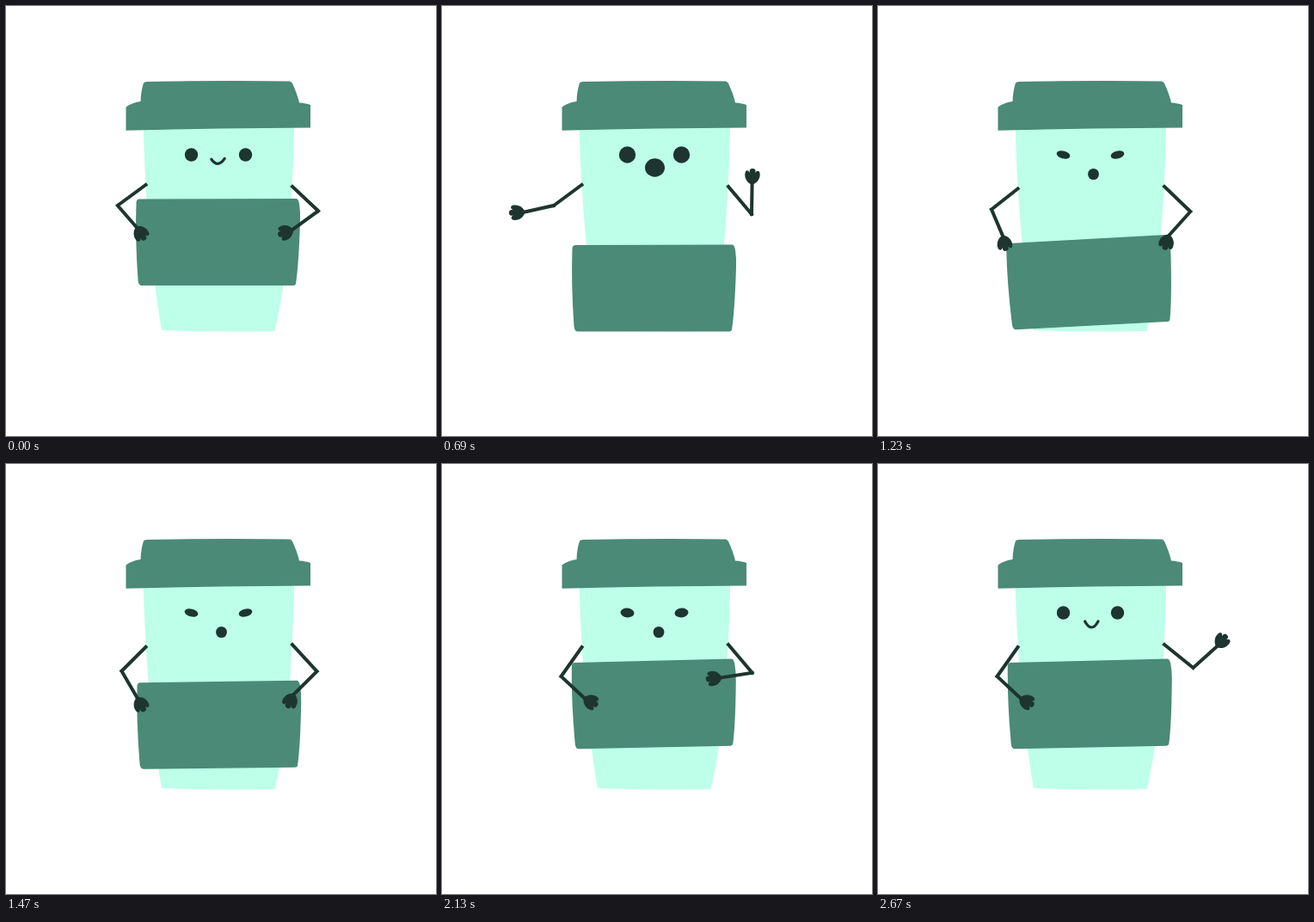
An HTML page for the animation above (2700 ms loop, 500 px wide and 500 px high).

```html
<!DOCTYPE html>
<html lang="en">
<head>
<meta charset="utf-8">
<title>Coffee cup</title>
<style>
  html, body { margin: 0; width: 100%; height: 100%; overflow: hidden; background: #fff; }
  svg { display: block; width: 100%; height: 100%; }
  .green { fill: #4a8a76; }
  .ink { fill: #1d352e; }
  .limb { fill: none; stroke: #1d352e; stroke-width: 4; stroke-linecap: square; }
  .smile { fill: none; stroke: #1d352e; stroke-width: 3.2; stroke-linecap: round; }
</style>
</head>
<body>
<svg viewBox="0 0 500 500">
  <defs>
    <path id="hand" class="ink" transform="scale(.94)" d="M-2 0C0 -6 6 -10.500 13 -9Q16.500 -8 15 -5L13 -3.500Q18 -4.500 18 0Q18 4.500 13 3.500L15 5Q16.500 8 13 9C6 10.500 0 6 -2 0Z"/>
  </defs>
  <path fill="#bdffe9" d="M159.700 138C161.500 225 170 315 181 377Q247 379.500 312.500 378C326.500 320 333 235 335.200 138Z"/>
  <path class="green" d="M139.500 117.500Q147 112 156.500 111Q157 98 160 89.500Q161 88 164 88Q250 86.500 330 87.500Q332 88 333 90Q339 103 341 112.500Q349 113 354 115V141.500Q250 142 139.500 144.800Z"/>
  <path id="sleeve" class="green" d="M155 224.500L338 224Q340 225 341 230Q342.500 240 342 250Q340.500 300 337 323Q336.500 325 334 325H158Q154 325 153.500 319Q150 270 151.500 228Q152 224.500 155 224.500Z"/>
  <ellipse id="eyeL" class="ink"/>
  <ellipse id="eyeR" class="ink"/>
  <ellipse id="mouth" class="ink"/>
  <path id="smile" class="smile"/>
  <path id="armL" class="limb"/>
  <use id="handL" href="#hand"/>
  <path id="armR" class="limb"/>
  <use id="handR" href="#hand"/>
</svg>
<script>
const LOOP = 2700, STEP = 30;
const el = id => document.getElementById(id);
const set = (id, attrs) => {
  for (const name in attrs) el(id).setAttribute(name, attrs[name]);
};

const span = (t, from, to) => Math.min(1, Math.max(0, (t - from) / (to - from)));
const ramp = (t, from, to) => {
  const u = span(t, from, to);
  return u * u * (3 - 2 * u);
};
// Sine swing that is zero outside its time span.
const swing = (t, from, to, turns) => Math.sin(span(t, from, to) * turns * 2 * Math.PI);
const mix = (a, b, u) => a.map((v, i) => v + (b[i] - v) * u);
// Eases from one pose to the next; each move is [pose, start, end].
const follow = (t, first, ...moves) =>
  moves.reduce((pose, [next, from, to]) => mix(pose, next, ramp(t, from, to)), first);

// Arm pose: shoulder height, elbow x, elbow y, forearm angle, forearm length, wrist bend.
const L = {
  rest: [208, 129.8, 232, 49, 34.5, 8],
  flung: [208, 130, 232, 167.5, 36, 10],
  grab: [212.5, 132, 236.5, 67, 34.5, 11],
  push: [213, 137.5, 246, 51, 40, -9],
  hold: [213, 138.5, 247, 43, 38, -15]
};
const R = {
  rest: [210, 363, 238.3, 144, 38, 16],
  up: [210, 360, 242, 271, 36, 1],
  out: [210, 359, 242, 325, 36, 0],
  grab: [210, 363.3, 239, 492, 38, -25],
  push: [210, 359.5, 243.5, 499, 40, -13],
  clasp: [210, 360.5, 243, 527, 37.5, 3],
  wave: [210, 366.5, 237, 678, 38, -8]
};
const eye = { open: [7.7, 7.7, 0], shut: [7.7, 1.8, 0], wide: [9.7, 9.7, 0], cross: [8, 4.5, 14], tired: [8, 5.4, 5] };

function drawArm(side, shoulderX, [sy, ex, ey, angle, len, bend], sway) {
  const rad = (angle + sway) * Math.PI / 180;
  const wx = ex + len * Math.cos(rad), wy = ey + len * Math.sin(rad);
  set('arm' + side, { d: `M${shoulderX} ${sy}L${ex} ${ey}M${ex} ${ey}L${wx} ${wy}` });
  set('hand' + side, { transform: `translate(${wx} ${wy}) rotate(${angle + sway + bend})` });
}

function drawArms(t) {
  const left = follow(t, L.rest, [L.flung, 360, 600], [L.grab, 960, 1170],
    [L.push, 1260, 1710], [L.hold, 1740, 1980]);
  drawArm('L', 162.5, left, -5 * swing(t, 690, 960, 1.5));

  const right = follow(t, R.rest, [R.up, 390, 660], [R.out, 720, 900], [R.grab, 900, 1170],
    [R.push, 1260, 1710], [R.clasp, 1980, 2130], [R.wave, 2100, 2400]);
  drawArm('R', 333, right, -22 * swing(t, 2430, 2670, 0.5));
}

function drawSleeve(t) {
  // dx, dy, tilt
  const [dx, dy, tilt] = follow(t, [0, 0, 0], [[0, 44, -5.2], 90, 270], [[0, 53.5, 0], 270, 360],
    [[0, 46.7, -3], 1110, 1230], [[2.5, 17, -3], 1230, 1650], [[0.3, 4.5, -1.2], 1710, 1950]);
  const tug = 3 * swing(t, 1230, 1650, 2);
  set('sleeve', { transform: `translate(${dx} ${dy}) rotate(${tilt + tug} 246.5 275)` });
}

function drawEyes(t) {
  const [rx, ry, tilt] = follow(t, eye.open, [eye.shut, 120, 240], [eye.wide, 300, 450],
    [eye.cross, 930, 1080], [eye.tired, 1800, 2130], [eye.open, 2130, 2310]);
  const pop = 0.7 * swing(t, 690, 930, 0.5);
  for (const [side, cx, sign] of [['L', 215.5, 1], ['R', 278.5, -1]]) {
    set('eye' + side, {
      cx, cy: 173, rx: rx + pop, ry: ry + pop, transform: `rotate(${sign * tilt} ${cx} 173)`
    });
  }
}

function drawMouth(t) {
  const open = t > 300 && t < 2250;
  el('mouth').style.display = open ? '' : 'none';
  el('smile').style.display = open ? 'none' : '';
  if (open) {
    const [cx, cy, rx, ry] = follow(t, [247, 176, 8.5, 1.6], [[247.5, 188, 11.5, 10.7], 300, 450],
      [[250.5, 195.5, 6.4, 6.6], 930, 1080], [[249.3, 195.5, 6.4, 6.6], 1500, 1710],
      [[252, 195.5, 6.4, 6.6], 1800, 2130], [[250, 188, 7, 3], 2130, 2250]);
    set('mouth', { cx, cy, rx, ry });
  } else {
    // centre x, y, slope, curve depth
    const [x, y, slope, depth] = follow(t, [246.5, 177.8, -0.4, 11], [[246.7, 176.3, -0.5, 0], 120, 240],
      [[248.3, 183, 0, 14], 2200, 2370]);
    set('smile', { d: `M${x - 7.7} ${y - slope}Q${x} ${y + depth} ${x + 7.7} ${y + slope}` });
  }
}

function draw(t) {
  drawSleeve(t);
  drawEyes(t);
  drawMouth(t);
  drawArms(t);
}

const start = performance.now();
function tick() {
  const t = (performance.now() - start) % LOOP;
  draw(Math.floor(t / STEP) * STEP);
  requestAnimationFrame(tick);
}
draw(0);
requestAnimationFrame(tick);
</script>
</body>
</html>
```
